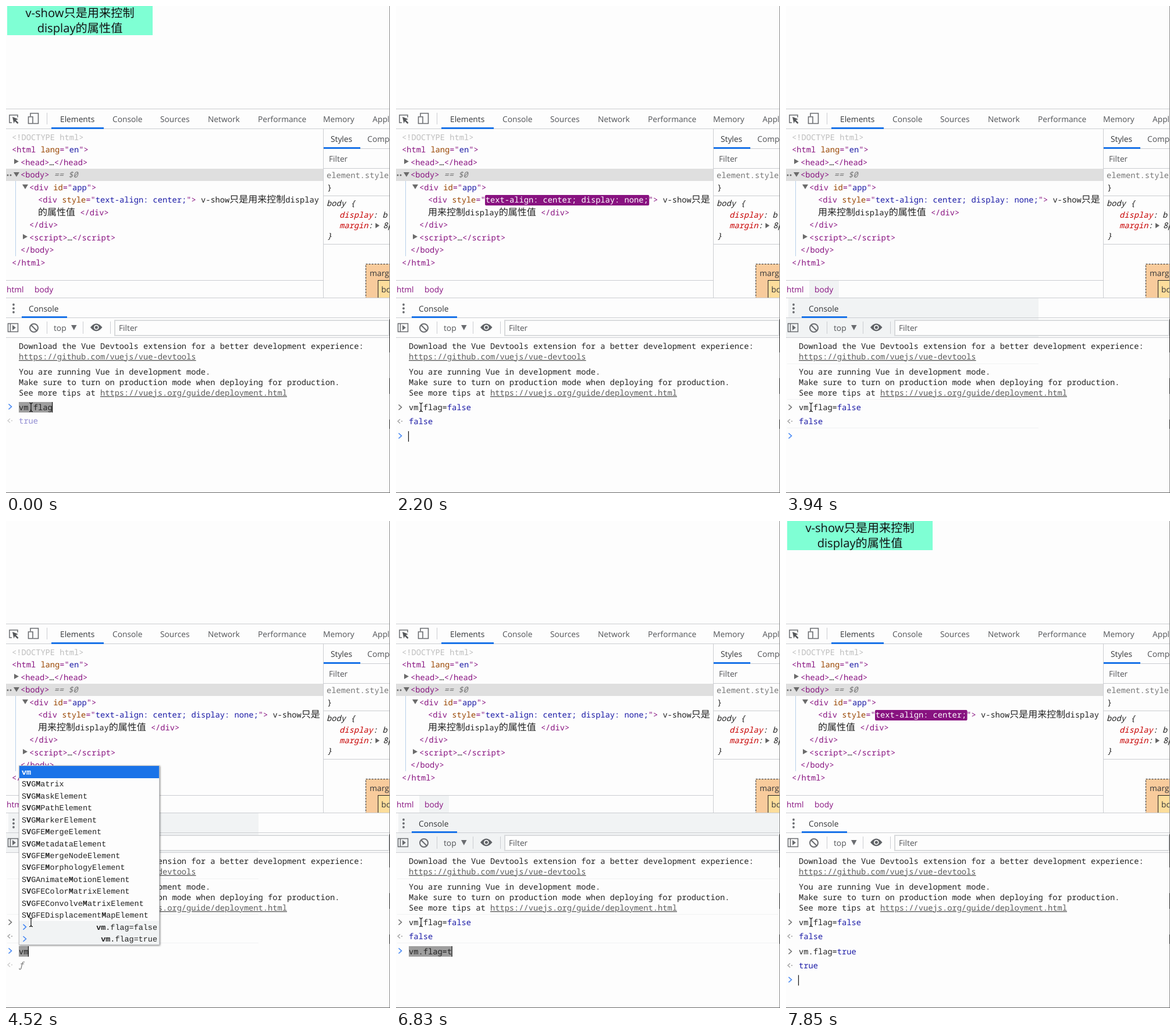
Write an HTML page that moves like this. It is 660 px wide and 835 px high and loops after 8 s.

```html
<!DOCTYPE html>
<html lang="en">
<head>
<meta charset="utf-8">
<title>v-show in the console</title>
<style>
  html, body { margin: 0; width: 100%; height: 100%; overflow: hidden; background: #fdfdfd; }
  svg { display: block; }
  text { white-space: pre; text-rendering: geometricPrecision; fill: #222; }
  .mono { font: 13.73px "Noto Sans Mono", "DejaVu Sans Mono", monospace; }
  .ui { font: 13.75px "Open Sans", "Noto Sans", sans-serif; fill: #505256; }
  .on { fill: #333538; }
  .page { font: 20.2px "Open Sans", "Noto Sans CJK SC", "Noto Sans CJK JP", sans-serif; fill: #111; text-anchor: middle; }
  .list { font: 13.45px "Liberation Mono", monospace; }
  .cjk { font: 16px "Noto Sans CJK SC", "Noto Sans CJK JP", "Noto Sans CJK", sans-serif; }
  .tag { fill: #881280; }
  .attr { fill: #994500; }
  .val { fill: #1a1aa6; }
  .pale { fill: #8f8bd2; }
  .dim { fill: #bdbdbd; }
  .grey { fill: #777; }
  .prop { fill: #c80000; }
  .link { fill: #5c5c5c; text-decoration: underline; }
  .it { font-style: italic; }
  .b { font-weight: bold; }
  .popup { filter: drop-shadow(1px 1px 1.5px #0007); }
</style>
</head>
<body>
<svg id="stage" width="660" height="835" viewBox="0 0 660 835">
  <g id="shade" fill="#f1f3f4">
    <rect id="crumb" x="40" y="471" width="51" height="29"/>
    <rect id="bar1" x="4" y="501" height="33"/>
    <rect id="bar2" x="0" y="535" height="33"/>
  </g>
  <g id="base"></g>
  <g id="live"></g>
  <path d="M40 680.5q3 0 3 2.5q0-2.5 3-2.5M43 682v11M40 695.5q3 0 3-2.5q0 2.5 3 2.5" fill="none" stroke="#111" stroke-width="1.2"/>
  <g id="edge"></g>
</svg>
<script>
const $ = id => document.getElementById(id);
const LOOP = 8000, CH = 8.24, ROW = 20.43;
const HIDE = 2200, SHOW = 7720;

const esc = s => s.replace(/&/g, '&amp;').replace(/</g, '&lt;');
const span = (s, cls = '') =>
  `<tspan class="${cls}">${esc(s).replace(/[\u4e00-\u9fff]+/g, '<tspan class="cjk">$&</tspan>')}</tspan>`;
const text = (x, y, body, cls = 'mono') => `<text x="${x}" y="${y}" class="${cls}">${body}</text>`;
const rect = (x, y, w, h, fill, more = '') =>
  `<rect x="${x}" y="${y}" width="${w}" height="${h}" fill="${fill}" ${more}/>`;
const path = (d, stroke, width = 1.5, fill = 'none') =>
  `<path d="${d}" fill="${fill}" stroke="${stroke}" stroke-width="${width}"/>`;
const hline = (x, y, w, c = '#cbcdd1') => rect(x, y, w, 1, c);
const vline = (x, y, h, c = '#cbcdd1') => rect(x, y, 1, h, c);
const tag = s => span(s, 'tag');
const treeY = i => 230 + 21.46 * i;
const mix = (a, b, k) => `rgb(${a.map((v, i) => Math.round(v + (b[i] - v) * k))})`;

function tabs() {
  const names = { Elements: 93, Console: 183, Sources: 265, Network: 347, Performance: 433, Memory: 545, Appl: 630 };
  const ink = '#6a6c70';
  return hline(0, 176, 660) + hline(0, 210, 660) + rect(78, 208, 90, 3, '#1a73e8') +
    Object.entries(names).map(([s, x]) => text(x, 199, s, x === 93 ? 'ui on' : 'ui')).join('') +
    path('M10 200H6V187H20V191', ink) +
    `<path d="M11 190l10 4-4 1.6 4.5 4.6-1.8 1.8-4.6-4.6-1.6 4z" fill="#55575a"/>` +
    path('M42 189V184H55.500V201.500H47', ink, 1.6) + path('M38.500 190H46V201.500H38.500Z', ink, 1.6) +
    vline(70, 183, 20);
}

function tree() {
  const down = (x, y) => `<path d="M${x} ${y}h10l-5 8z" fill="#6b6b6b"/>`;
  const right = (x, y) => `<path d="M${x} ${y}v9l8-4.500z" fill="#6b6b6b"/>`;
  return rect(0, 279, 545, 21, '#dfdfdf') + vline(16, 300, 129, '#b8cfea') +
    text(10, treeY(0), span('<!DOCTYPE html>', 'dim')) +
    text(10, treeY(1), tag('<html ') + span('lang', 'attr') + tag('="') + span('en', 'val') + tag('">')) +
    text(25, treeY(2), tag('<head>') + '…' + tag('</head>')) + right(14, 262) +
    text(25, treeY(3), tag('<body>') + span(' == $0', 'grey it')) + down(13, 285) +
    '<g fill="#666"><circle cx="3" cy="290" r="1.5"/><circle cx="8" cy="290" r="1.5"/></g>' +
    text(40, treeY(4), tag('<div ') + span('id', 'attr') + tag('="') + span('app', 'val') + tag('">')) + down(28, 306) +
    text(40, treeY(7), tag('</div>')) +
    text(40, treeY(8), tag('<script>') + '…' + tag('<\/script>')) + right(29, 391) +
    text(25, treeY(9), tag('</body>')) + text(10, treeY(10), tag('</html>')) +
    hline(0, 470, 545) + text(1, 491, tag('html'), 'ui') + text(49, 491, tag('body'), 'ui');
}

function styles() {
  return vline(545, 211, 289) + text(558, 233, 'Styles', 'ui on') + text(621, 233, 'Comp', 'ui') +
    hline(546, 244, 114) + rect(546, 242, 63, 3, '#1a73e8') + text(555, 267, 'Filter', 'ui') +
    hline(546, 278, 114) + text(551, 295, span('element.style', 'grey')) + text(552, 316, '}') +
    hline(546, 325, 114) + text(551, 343, 'body {', 'mono it') +
    text(573, 363, span('display', 'prop') + ': b', 'mono it') +
    text(573, 381, span('margin', 'prop') + ':', 'mono it') +
    '<path d="M635 372v9l7-4.500z" fill="#666"/>' + text(648, 381, '8p', 'mono it') +
    text(552, 399, '}', 'mono it') + hline(546, 408, 114) +
    `<svg x="618" y="442" width="42" height="58">` +
    rect(.5, .5, 80, 90, '#f8cb9c', 'stroke="#222" stroke-dasharray="3 2"') +
    rect(21.5, 28.5, 60, 60, '#fddd9b', 'stroke="#222"') +
    text(7, 21, 'margin', 'ui on') + text(27, 49, 'border', 'ui on') + '</svg>';
}

function drawer() {
  const ink = '#6a6c70';
  return hline(0, 500, 660) + hline(0, 534, 660) + hline(0, 568, 660) +
    [512, 518.5, 525].map(y => `<circle cx="13" cy="${y}" r="1.9" fill="${ink}"/>`).join('') +
    text(39, 524, 'Console', 'ui on') + rect(27, 532, 78, 3, '#1a73e8') +
    path('M3.500 544.500H20.500V558.500H3.500ZM7.500 545V558', ink) + `<path d="M11 547v9l6-4.500z" fill="${ink}"/>` +
    `<circle cx="48" cy="552" r="7" fill="none" stroke="${ink}" stroke-width="2"/>` + path('M43 547L53 557', ink, 2) +
    vline(70, 541, 21) + text(82, 557, 'top', 'ui') + `<path d="M112 547h9.500l-4.750 9z" fill="${ink}"/>` +
    vline(132, 541, 21) +
    `<path d="M145 551q10-13 20.500 0q-10.500 13-20.500 0z" fill="#5f6266"/><circle cx="155.300" cy="551" r="4.300" fill="#fdfdfd"/><circle cx="155.300" cy="551" r="2.600" fill="#5f6266"/>` +
    vline(179, 541, 21) + rect(187, 539, 471, 26, '#fdfdfd', 'stroke="#d9dbdd" stroke-width="2"') +
    text(194, 557, 'Filter', 'ui') +
    text(22, 588, 'Download the Vue Devtools extension for a better development experience:') +
    text(22, 606, span('https://github.com/vuejs/vue-devtools', 'link')) +
    text(22, 632, 'You are running Vue in development mode.') +
    text(22, 650, 'Make sure to turn on production mode when deploying for production.') +
    text(22, 668, 'See more tips at ' + span('https://vuejs.org/guide/deployment.html', 'link'));
}

// completion lists; "|" starts the italic part
const words = s => s.split(' ');
const history = ['vm.flag=false', 'vm.flag=true'];
const lists = {
  v: words('var void valueOf visualViewport vm ValidityState VideoPlaybackQuality VideoTrack VideoTrackList VisualViewport VTTCue Vue values view prevState SVGElement SVGAElement SVGNumber SVGPoint'),
  vm: words('vm SVGMatrix SVGMaskElement SVGMPathElement SVGMarkerElement SVGFEMergeElement SVGMetadataElement SVGFEMergeNodeElement SVGFEMorphologyElement SVGAnimateMotionElement SVGFEColorMatrixElement SVGFEConvolveMatrixElement SVGFEDisplacementMapElement'),
  members: words('flag $attrs $children $createElement $data $el $isServer $listeners $options $parent $props $refs $root $scopedSlots $slots $ssrContext $vnode _c _data'),
  f: ['flag', 'for |loop', 'for |of loop', 'function |definition'],
  flag: ['flag'],
  none: [],
  falses: words('false finally for function fetch find focus frames frameElement File FileList FileReader Float32Array Float64Array FocusEvent FontFace FormData Function FormDataEvent'),
  fal: ['false'],
  trues: words('true this throw try typeof toString toLocaleString toolbar top Text TextDecoder TextEncoder TextEvent TextMetrics TextTrack TimeRanges Touch TouchEvent TrackEvent'),
  tr: ['true']
};

// time, typed text, list, result preview, ghost text, popup width
const steps = [
  [0, 'vm.flag', '', 'true'],
  [290, 'vm.flag='],
  [440, 'vm.flag=', 'none', '', '', 249],
  [1300, 'vm.flag=f', 'falses', '', '', 261],
  [1740, 'vm.flag=fal', 'fal', '', '', 255],
  [1890, 'vm.flag=false'],
  [2200, ''],
  [4240, 'v', 'v'],
  [4520, 'vm', 'vm', 'ƒ'],
  [5130, 'vm.', 'members'],
  [5410, 'vm.f', 'f', 'false', 'lag'],
  [5540, 'vm.fl', 'flag', 'false', 'ag'],
  [5840, 'vm.flag', '', 'false'],
  [6120, 'vm.flag='],
  [6270, 'vm.flag=', 'none'],
  [6710, 'vm.flag=t'],
  [6980, 'vm.flag=t', 'trues', '', '', 308],
  [7110, 'vm.flag=tr', 'tr', '', '', 308],
  [7260, 'vm.flag=true'],
  [7720, '']
];
const fade = [2200, 2350, 2500, 2640, 2790, 2930, 3210, 3360, 3510];
const lastIndex = (times, t) => times.reduce((n, v, i) => v <= t ? i : n, 0);

// bold the letters that match the query, capitals first
function match(s, query) {
  const hits = new Set();
  let from = 0;
  for (const c of query) {
    let i = s.indexOf(c.toUpperCase(), from);
    if (i < 0) i = s.indexOf(c, from);
    if (i >= 0) { hits.add(i); from = i + 1; }
  }
  return [...s].map((c, i) => hits.has(i) ? span(c, 'b') : esc(c)).join('');
}

function popup(name, typed, bottom, w = 242) {
  const items = lists[name], rows = items.length + history.length;
  const h = Math.min(Math.round(rows * ROW) + 2, 377), top = bottom - h;
  const query = typed.split(/[.=]/).pop();
  let body = rect(0, 0, w, h, '#fdfdfd');
  items.forEach((item, i) => {
    const [head, tail] = item.split('|'), y = 1 + i * ROW;
    if (!i) body += rect(1, y, w - 2, 21, name === 'f' ? '#1267d6' : '#1a73e8');
    const inner = match(head, query) + (tail ? span(tail, 'it') : '');
    body += text(5, y + 15, i ? inner : `<tspan fill="#fff">${inner}</tspan>`, 'list');
  });
  history.forEach((item, i) => {
    const y = 1 + (items.length + i) * ROW;
    body += rect(1, y, w - 2, ROW, name === 'f' && !i ? '#e8edf8' : '#f1f3f4') +
      path(`M7.500 ${y + 6}l5 4.500l-5 4.500`, '#4285f4') +
      `<text x="${w - 4}" y="${y + 15}" text-anchor="end" class="list">${match(item, typed)}</text>`;
  });
  return `<g class="popup"><svg x="22" y="${top}" width="${w}" height="${h}">${body}` +
    rect(.5, .5, w - 1, h - 1, 'none', 'stroke="#c3c5c8"') + '</svg></g>';
}

const chevron = (y, c) => path(`M4.500 ${y - 4.500}l5 4.500l-5 4.500`, c, 1.6);
const reply = (y, c) => path(`M7 ${y - 3.500}l-4 3.500l4 3.500`, c, 1.2) + `<circle cx="10" cy="${y}" r="1" fill="${c}"/>`;
const entry = (y, value) =>
  chevron(y, '#6e6e6e') + text(22, y + 5, 'vm.flag=' + span(value, 'val')) +
  reply(y + 24, '#9a9a9a') + text(22, y + 29, span(value, 'val'));

function styledDiv(t) {
  const hidden = t >= HIDE && t < SHOW;
  const css = 'text-align: center;' + (hidden ? ' display: none;' : '');
  const k = t >= SHOW ? 0 : t < HIDE ? 8 : lastIndex(fade, t);
  const ink = k < 8 ? mix([255, 255, 255], [26, 26, 166], Math.min(1, k / 4)) : '#1a1aa6';
  const mark = k < 8
    ? rect(153, 324, css.length * CH + 2, 18, mix([136, 18, 128], [167, 143, 168], Math.min(1, k / 6)), `rx="2" opacity="${k > 6 ? .5 : 1}"`)
    : '';
  const [a, b] = hidden ? ['只是', '用来控制display的属性值'] : ['只是用来控制display', '的属性值'];
  return mark +
    text(55, treeY(5), tag('<div ') + span('style', 'attr') + tag('="') +
      `<tspan fill="${ink}">${css}</tspan>` + tag('">') + span(' v-show' + a)) +
    text(55, treeY(6), span(b + ' ') + tag('</div>'));
}

function caret(t, x, y) {
  if (t >= 910 && t < 1300 || t >= 2640 && t < 3210 || t >= 3940 && t < 4240) return '';
  const dotted = t >= 3210 && t < 3360;
  return `<path d="M${x} ${y - 9}v18" stroke="#111" stroke-width="1.2" ${dotted ? 'stroke-dasharray="1 1"' : ''}/>`;
}

function prompt(t, y) {
  const [, typed, list, preview, ghost = '', w] = steps[lastIndex(steps.map(s => s[0]), t)];
  let out = chevron(y - 1, '#4285f4');
  if (typed) out += rect(22, y - 9, typed.length * CH, 18, '#9e9e9e') + text(22, y + 5, typed + span(ghost, 'grey'));
  out += caret(t, typed ? 22 + typed.length * CH : 21.5, y);
  if (preview)
    out += reply(y + 23, '#c8c8c8') + text(22, y + 28, span(preview, preview === 'ƒ' ? 'grey it' : 'pale'));
  return out + (list ? popup(list, typed, y - 11, w) : '');
}

function live(t) {
  const shaded = t >= 2350 && t < SHOW;
  let out = '';
  if (t < HIDE || t >= SHOW)
    out += rect(2, 0, 250, 50, '#7fffd4') + text(127, 19, 'v-show只是用来控制', 'page') + text(127, 45, 'display的属性值', 'page');
  out += styledDiv(t);
  if (shaded) out += [613, 674, 723].map(y => hline(2, y, (t < 4670 ? 434 : 657) - 2, '#f1f2f3')).join('');
  if (t >= HIDE) out += entry(688, 'false');
  if (t >= SHOW) out += entry(738, 'true');
  return out + prompt(t, t < HIDE ? 688 : t < SHOW ? 738 : 787.5);
}

$('base').innerHTML = tabs() + tree() + styles() + drawer();
$('edge').innerHTML = vline(659, 0, 835, '#8c8c8c') + hline(0, 834, 660, '#666') +
  [[537, 57], [638, 27], [709, 16]].map(([y, h]) => vline(659, y, h, '#222')).join('');

let shown = '';
function render(t) {
  $('shade').style.display = t >= 2350 && t < SHOW ? '' : 'none';
  const right = t < 4670 ? 434 : 660;
  $('bar1').setAttribute('width', right - 4);
  $('bar2').setAttribute('width', right);
  const html = live(t);
  if (html !== shown) $('live').innerHTML = shown = html;
}

const start = performance.now();
function tick() {
  render((performance.now() - start) % LOOP);
  requestAnimationFrame(tick);
}
tick();
</script>
</body>
</html>
```
